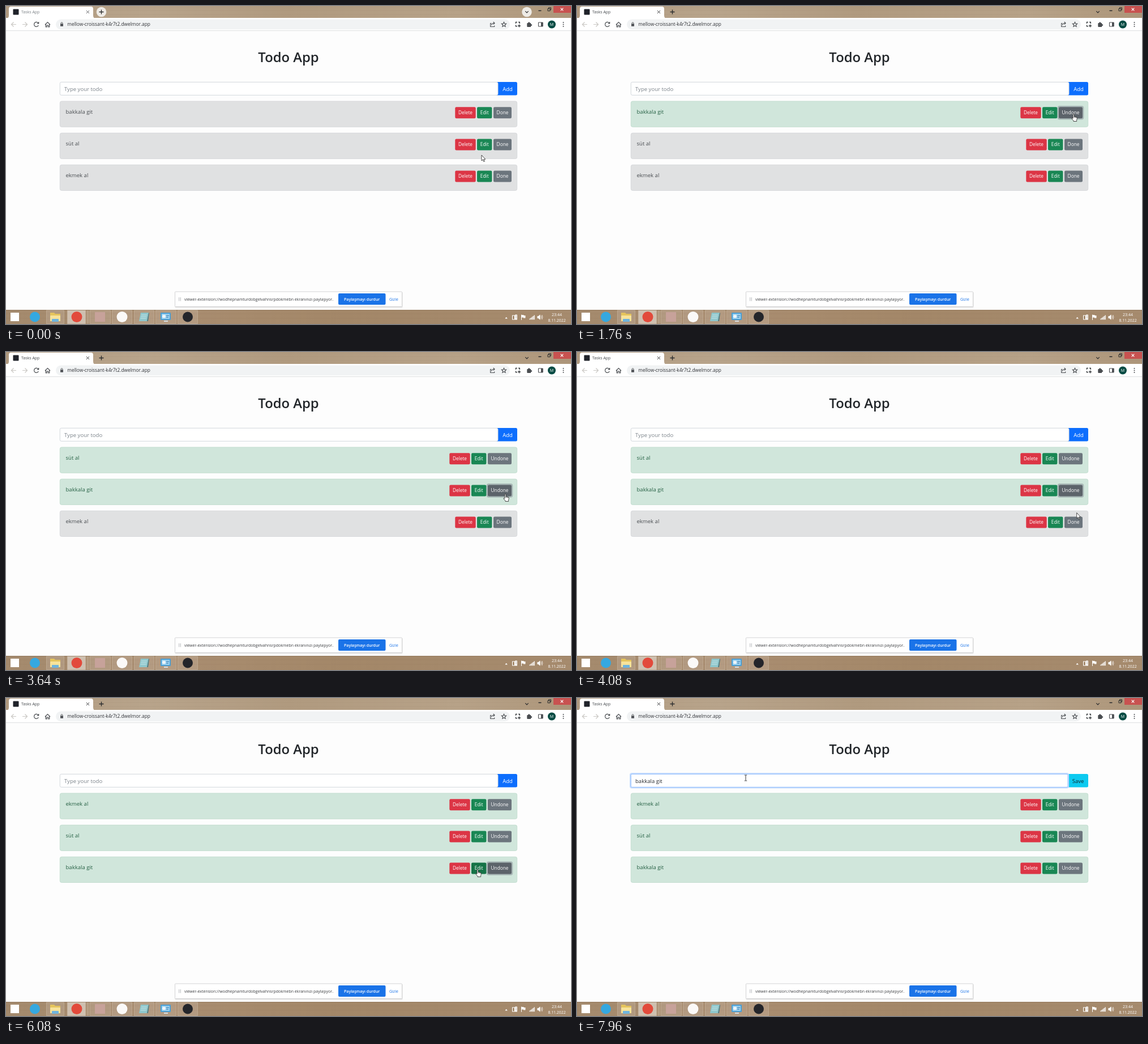
These frames come from a looping animation (998x561 px, 8000 ms). An HTML page:

```html
<!DOCTYPE html>
<html lang="tr">
<head>
<meta charset="utf-8">
<title>Todo App</title>
<style>
  html, body { margin: 0; width: 100%; height: 100%; overflow: hidden; background: #fdfdfd; }
  svg { display: block; width: 100vw; height: 100vh; }
  text { font-family: "Open Sans", "Noto Sans", sans-serif; white-space: pre; }
  .line { fill: none; stroke: #4a4d51; stroke-width: 1.1; }
</style>
</head>
<body>
<svg viewBox="0 0 998 561">
  <defs>
    <linearGradient id="wood">
      <stop offset="0" stop-color="#b09a80"/><stop offset=".25" stop-color="#b8a48b"/>
      <stop offset=".5" stop-color="#b09a7f"/><stop offset=".8" stop-color="#b7a288"/>
      <stop offset="1" stop-color="#ad967a"/>
    </linearGradient>
    <linearGradient id="bar">
      <stop offset="0" stop-color="#a48a6d"/><stop offset=".3" stop-color="#a98d70"/>
      <stop offset=".6" stop-color="#a38768"/><stop offset="1" stop-color="#a68b6e"/>
    </linearGradient>
  </defs>
  <rect width="998" height="561" fill="#fdfdfd"/>
  <g id="chrome"></g>
  <g id="page"></g>
  <g id="desktop"></g>
  <g id="pointer"></g>
</svg>
<script>
const LOOP = 8000;
const layer = id => document.getElementById(id);

const rect = (x, y, w, h, fill, r = 0, extra = '') =>
  `<rect x="${x}" y="${y}" width="${w}" height="${h}" rx="${r}" fill="${fill}" ${extra}/>`;
const circle = (x, y, r, fill, extra = '') => `<circle cx="${x}" cy="${y}" r="${r}" fill="${fill}" ${extra}/>`;
const path = (d, extra = 'class="line"') => `<path d="${d}" ${extra}/>`;
const text = (str, x, y, size, fill, anchor = 'start', weight = 400) =>
  `<text x="${x}" y="${y}" font-size="${size}" fill="${fill}" text-anchor="${anchor}" font-weight="${weight}">${str}</text>`;
const stroke = (color, width = 1) => `fill="none" stroke="${color}" stroke-width="${width}"`;

// Browser window frame; an inactive window shows round button backgrounds.
function drawChrome(active) {
  const ink = active ? '#2e2f31' : '#55575a';
  const pale = '#c9c7c3';
  return rect(0, 0, 998, 22, 'url(#wood)')
    + path('M0 3H998M0 8H998M0 15H998', stroke('#9f886c', .5) + ' opacity=".35"')
    + path('M0 22Q5 22 5 17V5Q5 1 9 1H150Q154 1 154 5V17Q154 22 159 22Z', 'fill="#fff"')
    + rect(12.5, 5.5, 10, 10, '#20232a', 1)
    + text('Tasks App', 27, 13.2, 7, active ? '#45494d' : '#7b8085')
    + path('M142 8l5 5M147 8l-5 5', stroke(ink))
    + (active ? '' : circle(168.5, 10.5, 8.7, '#eeebe6') + circle(920, 10.5, 8.7, '#eeebe6'))
    + path('M164.5 10.5h8M168.5 6.5v8', stroke('#292a2c', 1.3))
    + path('M917.3 9.2l2.7 2.7l2.7-2.7', stroke('#292a2c', 1.2))
    + path('M940.5 8.3h5', stroke('#292a2c', 1.5))
    + path('M957 4.7h4v4h-4zM958.5 4.5v-1.7h4v4h-1.5', stroke('#292a2c'))
    + rect(967, 0, 31, 12, '#c85250') + path('M979.7 3.7l4.6 4.6M984.3 3.7l-4.6 4.6', stroke('#fff', 1.2))
    + rect(0, 21, 998, 22, '#fff') + rect(0, 43, 998, 1, '#dfe0e1')
    + rect(88, 23.5, 802, 18, '#f1f3f4', 9)
    + path('M18 32.5H9.5M13.5 28.5l-4 4l4 4', stroke(pale, 1.2))
    + path('M29 32.5h8.5M33.5 28.5l4 4l-4 4', stroke(pale, 1.2))
    + path('M57 30.2A4 4 0 1 0 57.3 34M57.7 28v3h-3', stroke('#4a4d51', 1.2))
    + path('M69 33l4.5-4.5L78 33M70.3 32v5h2v-3h2.4v3h2v-5', stroke('#4a4d51', 1.2))
    + rect(96, 31.2, 5, 4.6, '#505357', .6) + path('M97 31.4v-1a1.5 1.5 0 0 1 3 0v1', stroke('#505357'))
    + text('mellow-croissant-k4r7t2.dwelmor.app', 108.3, 35.4, 8.3, '#303236')
    + path('M857.5 30.5h-1.8v6h7v-2M857.5 34q.5-3.7 5-3.7M860.8 28l2.3 2.3l-2.3 2.3')
    + path('M879.5 28.3l1.2 2.8l3 .2l-2.3 2l.7 3l-2.6-1.6l-2.6 1.6l.7-3l-2.3-2l3-.2z')
    + path('M900.5 31v-2.5h2.3M905 28.5h2.3v2.5M900.5 33.5v2.3h2.3M906.5 32.5v5M904 35h5', stroke('#3c4043', 1.4))
    + rect(920.3, 30, 7, 7, '#4a4d51', 1) + circle(923.8, 29.7, 1.5, '#4a4d51') + circle(927.6, 33.5, 1.5, '#4a4d51')
    + rect(940.5, 29, 7.6, 7, 'none', .6, 'class="line"') + rect(945, 29, 3.4, 7, '#4a4d51')
    + circle(964, 32.5, 7, '#064b43') + text('M', 964, 35.1, 7, '#fff', 'middle')
    + [29, 32.5, 36].map(y => circle(984.5, y, 1, '#4a4d51')).join('');
}

function drawDesktop() {
  const slots = [[71, 32], [108, 33], [148, 37], [187, 36], [226, 36], [264, 37], [303, 36]];
  const folder = path('M78 541h7l2 2h9v13H78z', 'fill="#e5c45c"') + rect(78, 546, 18, 10, '#f7e39a', 1)
    + rect(81, 552, 12, 5, '#6fb4dd', 1);
  const notepad = path('M238 541h14l-3 15h-14z', 'fill="#8fc7cc"') + path('M239 545h10M238.3 548h10M237.6 551h10', stroke('#d7eeee', .8))
    + path('M252 541l-3 15h2l2-14z', 'fill="#4d7c83"');
  const panel = rect(273, 541, 18, 13, '#4b9fd5', 1) + rect(275, 543, 14, 9, '#9fd4f1')
    + circle(279, 547.5, 2.8, '#f1f6fa') + path('M283 546h5M283 549h4', stroke('#2f6fa6')) + rect(279, 555, 7, 2, '#d7dee3');
  return rect(298.5, 505, 402, 27, '#000', 1, 'opacity=".12"')
    + rect(298.5, 504, 401, 26.5, '#fff', 1, 'stroke="#c9cacb" stroke-width=".8"')
    + path('M305.7 514v6.5M308.3 514v6.5', stroke('#a5a8ab', .8))
    + text('viewer-extension://wodhepnamturdobgelvahnsrpdokmebn ekranınızı paylaşıyor.', 315, 520, 7, '#3b3d40')
    + rect(587, 507, 83.5, 20, '#1a73e8', 2) + text('Paylaşmayı durdur', 628.7, 519.7, 7, '#fff', 'middle', 600)
    + text('Gizle', 677, 519.7, 7, '#1a73e8')
    + rect(0, 536, 998, 25, 'url(#bar)') + rect(0, 536, 998, .8, '#8e7457')
    + path('M0 543H998M0 551H998', stroke('#92775a', .6) + ' opacity=".3"')
    + slots.map(([x, w], i) => rect(x + .5, 537, w - 1, 23.5, '#fff', 0,
        `fill-opacity="${i === 1 ? .45 : .12}" stroke="#d3c2ae" stroke-opacity=".6" stroke-width=".8"`)).join('')
    + path('M143.5 537v23.5M146 537v23.5', stroke('#d3c2ae', .8))
    + rect(8, 541, 15, 15, '#fff') + circle(51, 548.5, 9, '#35a8e0') + folder
    + circle(125, 548.5, 9.5, '#e24a3b') + rect(157, 540, 18, 17, '#c7a29a') + circle(205, 548.5, 9.5, '#fbf9f8')
    + notepad + panel + circle(321, 548.5, 9, '#24252a')
    + path('M881.5 551.5l2.2-2.8l2.2 2.8z', 'fill="#fff"')
    + rect(894.5, 546, 4, 7, 'none', 0, stroke('#fff')) + rect(899, 544.5, 4, 9, '#fff', .5) + path('M900 547h2M900 550h2', stroke('#80684e', .8))
    + path('M910.5 544.5v9.5', stroke('#fff')) + path('M911 545h3.5v1h3v4.5h-3.5v-1h-3z', 'fill="#fff"')
    + [0, 1, 2, 3, 4].map(i => rect(924.5 + i * 2, 551.5 - i * 1.5, 1.4, 1.8 + i * 1.5, '#fff')).join('')
    + path('M938.5 547h2l3-2.7v9.4l-3-2.7h-2z', 'fill="#fff"') + path('M945 546.5q1.5 2.5 0 5M946.7 545q2.4 4 0 8', stroke('#fff', .8))
    + text('23:44', 973, 546.8, 7, '#fff', 'middle') + text('8.11.2022', 973, 556.8, 6.9, '#fff', 'middle');
}

// Story: three "Done" clicks, then "Edit", then a click into the input.
const DONE_CLICKS = [1200, 2950, 4500], EDIT_CLICK = 6300, INPUT_CLICK = 7700;
const TODOS = ['bakkala git', 'süt al', 'ekmek al'];
const ORDERS = [[0, 1, 2], [0, 1, 2], [1, 0, 2], [2, 1, 0]];
const TRACK = [
  [0, 840, 263], [160, 840, 263], [820, 877, 190], [1900, 877, 190], [2560, 883, 240], [3100, 883, 240],
  [3600, 882, 250], [3760, 882, 250], [4280, 883, 300], [5300, 883, 300], [5920, 833, 302],
  [6700, 833, 302], [7560, 298, 141], [LOOP, 298, 141]
];
const BUTTONS = {
  Delete: { fill: '#dc3545', hover: '#bb2d3b', ring: '#e15361' },
  Edit: { fill: '#198754', hover: '#157347', ring: '#3c996e' },
  Done: { fill: '#6c757d', hover: '#5c636a', ring: '#828a91' }
};

function pointerAt(t) {
  const i = Math.max(1, TRACK.findIndex(key => key[0] > t));
  const [t0, x0, y0] = TRACK[i - 1], [t1, x1, y1] = TRACK[i];
  const p = (t - t0) / (t1 - t0), e = p * p * (3 - 2 * p);
  return { x: x0 + (x1 - x0) * e, y: y0 + (y1 - y0) * e };
}

function drawPage(t, mouse) {
  const step = DONE_CLICKS.filter(time => t >= time).length;
  const editing = t >= EDIT_CLICK, typing = t >= INPUT_CLICK;
  const inside = (x, y, w, h) => mouse.x >= x && mouse.x <= x + w && mouse.y >= y && mouse.y <= y + h;
  let cursor = 'arrow';

  const button = (kind, label, x, y, w, focused) => {
    const style = BUTTONS[kind], hovered = inside(x, y, w, 20);
    if (hovered) cursor = 'hand';
    return (focused ? rect(x - 2.3, y - 2.3, w + 4.6, 24.6, style.ring, 4, 'opacity=".5"') : '')
      + rect(x, y, w, 20, hovered || focused ? style.hover : style.fill, 2.2)
      + text(label, x + w / 2, y + 12.9, 8.3, '#fff', 'middle');
  };

  const row = (todo, i) => {
    const y = 168 + i * 56.1, done = i < step, shift = done ? 10 : 0;
    const focusRow = step > 0 && !typing && i === step - 1;
    return rect(95.3, y, 807.4, 45.3, done ? '#d0e6db' : '#e0e1e2', 3,
        `stroke="${done ? '#bcdacb' : '#d2d4d7'}" stroke-width=".8"`)
      + text(TODOS[todo], 105.5, y + 21.6, 9.55, done ? '#245f43' : '#484c50')
      + button('Delete', 'Delete', 793.3 - shift, y + 10.3, 36.4, false)
      + button('Edit', 'Edit', 832 - shift, y + 10.3, 26.4, focusRow && editing)
      + button('Done', done ? 'Undone' : 'Done', 861 - shift, y + 10.3, 32 + shift, focusRow && !editing);
  };

  const addX = editing ? 867 : 869, addW = 903 - addX;
  const addHover = inside(addX, 134, addW, 24);
  if (inside(95, 134, addX - 95, 24)) cursor = 'beam';
  if (addHover) cursor = 'hand';
  const addFill = editing ? (addHover ? '#31d2f2' : '#0dcaf0') : (addHover ? '#0b5ed7' : '#0d6efd');

  const markup = text('Todo App', 499, 99.3, 23.8, '#212529', 'middle', 600)
    + rect(addX - 4, 134, addW + 4, 23.6, addFill, 2.5)
    + (typing ? rect(93, 132, addX - 91, 27.6, '#c5dcfd', 4) : '')
    + rect(95.3, 134.3, addX - 95.3, 23, '#fff', typing ? 2 : 2.5, `stroke="${typing ? '#86b7fe' : '#ced4da'}" stroke-width=".9"`)
    + text(editing ? 'bakkala git' : 'Type your todo', 103, 149.6, 9.55, editing ? '#272b2f' : '#7b838a')
    + text(editing ? 'Save' : 'Add', addX + addW / 2, 149.6, 9.55, editing ? '#10262c' : '#fff', 'middle')
    + ORDERS[step].map(row).join('');
  return { markup, cursor, active: step > 0 };
}

const outline = 'fill="#fff" stroke="#222" stroke-width=".8" stroke-linejoin="round"';
const CURSORS = {
  arrow: path('M0 0V10L2.3 7.9L3.9 11.6L5.5 10.9L3.9 7.4L6.8 7.3Z', outline),
  hand: path('M-1 1Q0 -.6 1 1V5L5 5.9Q6.6 6.4 6.4 8.3L5.6 11.2V13.5H0V12.2L-3.2 8.8Q-3.5 6.9 -1 8.3Z', outline)
    + path('M1 5v2.4M3 5.5v2M4.9 6v1.8', stroke('#222', .6)),
  beam: path('M-2.2-5H-.6L0-4.5L.6-5H2.2M0-4.5V4.5M-2.2 5H-.6L0 4.5L.6 5H2.2', stroke('#222', .9))
};

layer('desktop').innerHTML = drawDesktop();
let wasActive;

function frame() {
  const t = performance.now() % LOOP;
  const mouse = pointerAt(t);
  const { markup, cursor, active } = drawPage(t, mouse);
  layer('page').innerHTML = markup;
  if (active !== wasActive) layer('chrome').innerHTML = drawChrome(wasActive = active);
  layer('pointer').innerHTML = `<g transform="translate(${mouse.x} ${mouse.y})">${CURSORS[cursor]}</g>`;
  requestAnimationFrame(frame);
}
frame();
</script>
</body>
</html>
```
